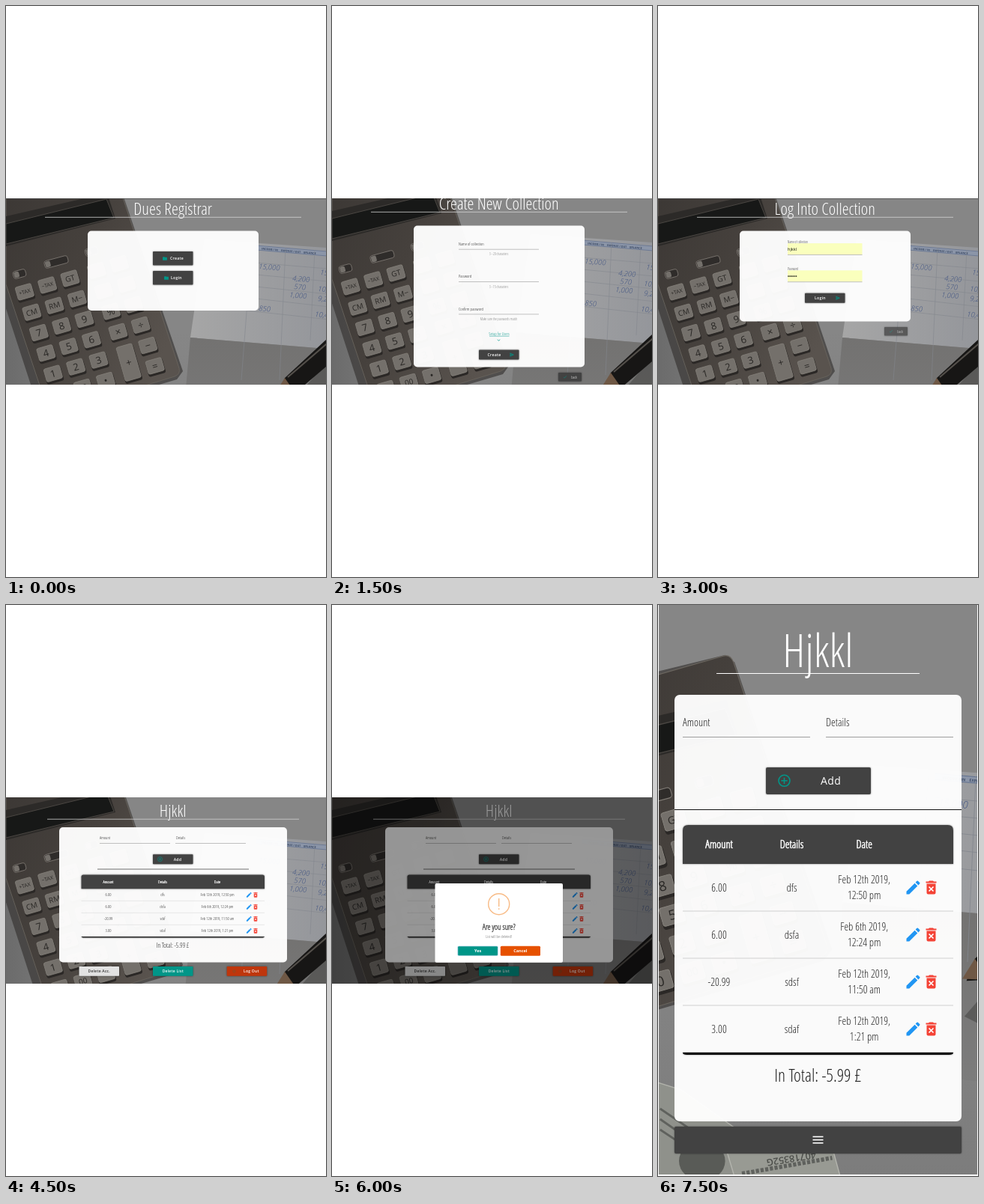
Write an HTML page that moves like this. It is 427 px wide and 763 px high and loops after 9000 ms.

```html
<!DOCTYPE html>
<html lang="en">
<head>
<meta charset="utf-8">
<title>Shared expenses app</title>
<style>
  html, body { margin: 0; width: 100%; height: 100%; overflow: hidden; background: #fff; }
  svg { display: block; width: 427px; height: 763px; }
  text { font-family: "Open Sans", "Noto Sans", sans-serif; white-space: pre; }
  .narrow { font-stretch: 75%; font-weight: 300; }
  .raised { filter: drop-shadow(0 .7px .8px rgba(0, 0, 0, .45)); }
  .ink { font-style: italic; font-weight: 300; fill: #3c5080; }
</style>
</head>
<body>
<svg id="stage" viewBox="0 0 427 763"></svg>
<script>
const stage = document.getElementById('stage');
const TEAL = '#009688', DARK = '#424242';

// Use the condensed face where it exists, otherwise narrow the regular one evenly.
function condensedScale() {
  stage.innerHTML = '<text font-size="50" font-weight="300">Collection</text>' +
    '<text class="narrow" font-size="50">Collection</text>';
  const [normal, narrow] = [...stage.children].map(t => t.getComputedTextLength());
  return narrow < normal * .95 ? 1 : .7;
}
const squeeze = condensedScale();

const rect = (x, y, w, h, fill, r = 0, extra = '') =>
  `<rect x="${x}" y="${y}" width="${w}" height="${h}" rx="${r}" fill="${fill}" ${extra}/>`;
const line = (x1, x2, y, color, width = .6) =>
  `<path d="M${x1} ${y}H${x2}" stroke="${color}" stroke-width="${width}"/>`;
const poly = (points, fill, extra = '') => `<polygon points="${points}" fill="${fill}" ${extra}/>`;
// Only the light cut is condensed, so heavier text gets an outline.
const narrow = (x, y, size, str, fill = '#222', anchor = 'middle', boldness = 0) =>
  `<text class="narrow" transform="translate(${x} ${y}) scale(${squeeze} 1)" font-size="${size}"
    text-anchor="${anchor}" fill="${fill}" stroke="${fill}" stroke-width="${size * boldness}">${str}</text>`;
const label = (x, y, str, fill = '#fff', size = 5.2, weight = 600, spacing = .25) =>
  `<text x="${x}" y="${y}" font-size="${size}" font-weight="${weight}" letter-spacing="${spacing}"
    text-anchor="middle" fill="${fill}">${str}</text>`;
const button = (x, y, w, h, fill = DARK, r = .8) => rect(x, y, w, h, fill, r, 'class="raised"');
const panel = (x, y, w, h, r = 5) => rect(x, y, w, h, 'rgba(255,255,255,.96)', r);

const ICONS = {
  edit: '<path fill="#2196f3" d="M3 17.2V21h3.8L17.8 9.9l-3.7-3.7zM20.7 7a1 1 0 0 0 0-1.4l-2.3-2.3a1 1 0 0 0-1.4 0l-1.9 1.8 3.8 3.8z"/>',
  trash: '<path fill="#f44336" d="M6 19a2 2 0 0 0 2 2h8a2 2 0 0 0 2-2V7H6zM15.5 4l-1-1h-5l-1 1H5v2h14V4z"/>' +
    '<path stroke="#fff" stroke-width="1.7" d="M9 11l6 6m0-6l-6 6"/>',
  folder: `<path fill="${TEAL}" d="M10 4H4a2 2 0 0 0-2 2v12a2 2 0 0 0 2 2h16a2 2 0 0 0 2-2V8a2 2 0 0 0-2-2h-8z"/>`,
  send: `<path fill="none" stroke="${TEAL}" stroke-width="2.6" d="M4 19l16-7L4 5l2 7zM6 12h9"/>`,
  plus: `<path fill="none" stroke="${TEAL}" stroke-width="1.9" d="M12 7v10M7 12h10M3 12a9 9 0 1 0 18 0a9 9 0 1 0-18 0"/>`,
  back: `<path fill="none" stroke="${TEAL}" stroke-width="2" d="M4 13l5 5L19 6"/>`,
  down: `<path fill="none" stroke="${TEAL}" stroke-width="3" d="M5 9l7 6 7-6"/>`,
  exit: '<path fill="none" stroke="#6a5a32" stroke-width="2.5" d="M12 4v8M7 7a7 7 0 1 0 10 0"/>'
};
const icon = (name, cx, cy, size) =>
  `<g transform="translate(${cx - size / 2} ${cy - size / 2}) scale(${size / 24})">${ICONS[name]}</g>`;

function calculator() {
  const rows = [['+TAX', '−TAX', 'GT', '', ''], ['CM', 'RM', 'M−', '', ''], ['7', '8', '9', '%', ''],
    ['4', '5', '6', '×', '÷'], ['1', '2', '3', null, '−'], ['0', '00', '•', null, '=']];
  const key = (col, row, str, height = 19) => {
    const c = col + (col > 2 ? .17 : 0), r = row - 2;
    const size = str.length > 3 ? 7 : str.length > 1 ? 10 : 13;
    return `<g transform="translate(${44 + 30.3 * c + 9.5 * r} ${437 - 9 * c + 27.3 * r}) rotate(-16)">` +
      rect(-11.5, 1 - height / 2, 23.5, height + 1.5, '#2b2826', 3) +
      rect(-11, -height / 2, 22, height - 1, '#74706b', 2.5, 'stroke="#87837d" stroke-width=".7"') +
      `<text y="${size * .36 - .5}" text-anchor="middle" font-size="${size}" fill="#292725">${str}</text></g>`;
  };
  const toggle = (x, y, w) => `<g transform="translate(${x} ${y}) rotate(-15)">` +
    rect(-w / 2, -5, w, 10, '#2f2c2a', 3, 'stroke="#7f7a74" stroke-width=".8"') +
    rect(-w / 2 + 1, -4, 7, 8, '#74706b', 2) + '</g>';
  let out = poly('0,240 134,207 143,214 236,488 228,499 48,552 -4,392', '#353230', 'opacity=".65"') +
    '<path d="M0 246L132 208Q139 206 142 214L231 484Q233 492 225 495L58 546L0 372Z" fill="url(#body)" stroke="#6b665f" stroke-width=".8"/>' +
    poly('0,281 135,250 146,284 0,321', '#2c2a28') +
    poly('0,291 134,258 144,283 0,318', '#171817', 'stroke="#4a4642"') +
    toggle(18, 358, 17) + toggle(67, 342, 32) + toggle(114, 328, 17);
  rows.forEach((row, r) => row.forEach((str, c) => { if (str !== null) out += key(c, r, str); }));
  return out + key(3, 4.5, '+', 48);
}

function ledger() {
  const notes = [[337, 351, '15,000'], [382, 367, '4,200'], [384, 378, '570'], [378, 389, '1,000'],
    [337, 407, '850'], [419, 359, '15,000'], [416, 381, '10,000'], [416, 394, '9,200'], [412, 415, '10,400']];
  return poly('265,312 440,324 440,459 246,443', 'url(#paper)') +
    poly('246,443 440,459 440,620 232,600', 'url(#shade)') +
    poly('334,320 440,329 440,335 334,326', '#8b95a8') +
    '<path d="M334 320L440 329M334 326L440 335" stroke="#5f6f8e" stroke-width=".7"/>' +
    '<path d="M373 323L365 500M412 326L406 447M328 319L314 500M334 343L440 352M334 359L440 369M334 375L440 386M334 391L440 403M322 407L440 420" stroke="#84878e" stroke-width=".6"/>' +
    '<text transform="translate(341 325.5) rotate(5)" font-size="3.6" font-weight="700" fill="#3c4b66">INCOME / IN    EXPENSE / OUT    BALANCE</text>' +
    notes.map(([x, y, s]) => `<text class="ink" transform="translate(${x} ${y}) rotate(5)" font-size="9.5">${s}</text>`).join('');
}

const pen = poly('440,462 440,500 378,560 362,552', '#3f3e3d', 'opacity=".5"') +
  poly('440,434 440,471 386,517 364,518 372,497', '#171615') +
  poly('372,497 386,517 360,516', '#6f5845') +
  '<path d="M376 496L440 441" stroke="#54504b" stroke-width="2"/>';

const banknotes = poly('60,612 92,622 168,676 175,720 60,720', '#8f918b', 'stroke="#b0b1aa"') +
  '<ellipse cx="112" cy="690" rx="22" ry="19" fill="#595b57"/>' +
  '<path d="M72 640l50 34M72 650l40 28M72 660l24 16" stroke="#5f615d" stroke-width="2"/>' +
  poly('136,682 232,662 244,706 148,722', '#989a93', 'stroke="#b4b5ae"') +
  '<text transform="translate(220 681) rotate(171)" font-size="9" font-weight="600" fill="#4c4e4a">40718352G</text>' +
  '<path d="M150 702L236 687" stroke="#5f615d" stroke-width="4" stroke-dasharray="3 1.5"/>';

const gradient = (id, x2, y2, ...colors) => `<linearGradient id="${id}" x2="${x2}" y2="${y2}">` +
  colors.map((c, i) => `<stop offset="${i / (colors.length - 1)}" stop-color="${c}"/>`).join('') + '</linearGradient>';
const defs = `<defs>
  ${gradient('body', 1, .6, '#3b3734', '#46413d', '#59534e')}
  ${gradient('desk', 0, 1, '#868686', '#868686', '#7c7c7c')}
  ${gradient('paper', 1, 0, '#a6a6a6', '#93959a')}
  ${gradient('shade', 0, 1, '#737271', '#7c7c7c')}
  ${gradient('corner', 1, 0, '#6a6a6a', '#7a7a7a')}
  <clipPath id="wide"><rect y="257" width="427" height="249"/></clipPath>
  <clipPath id="tall"><rect x="1" width="425" height="761"/></clipPath>
  <g id="photo">${rect(-5, 150, 450, 570, 'url(#desk)') + poly('-5,350 70,350 70,560 -5,560', 'url(#corner)') +
    ledger() + calculator() + pen + banknotes}</g>
</defs>`;

const photo = transform => `<use href="#photo" transform="${transform}"/>`;
const wide = (dy, content) => `<g clip-path="url(#wide)">${photo(`translate(0 ${dy})`)}${content}</g>`;
const heading = (str, y, x1 = 52, x2 = 394) =>
  narrow(222.7, y - 3.3, 22.7, str, '#fff') + line(x1, x2, y, '#d4d4d4', .8);
const topEdge = line(0, 427, 257.4, '#484848', .8);
const backButton = y => button(302, y, 31, 11.5) + icon('back', 311, y + 5.7, 6) + narrow(323, y + 7.6, 5.2, 'back', '#fff');
const sendButton = (y, str) => button(196, y, 53.5, 13) + label(216.5, y + 8.5, str) + icon('send', 240, y + 6.5, 7);

function home() {
  const choice = (y, str, iconX, textX) => button(196, y, 53.5, 18.5) + icon('folder', iconX, y + 9.5, 7) + label(textX, y + 11.3, str);
  return wide(0, topEdge + heading('Dues Registrar', 282.3) + panel(109, 300.5, 228, 106.5) +
    choice(328, 'Create', 212, 228) + choice(354, 'Login', 214, 227.5));
}

function create() {
  const field = (y, name, hint) => narrow(169, y, 5.6, name, '#222', 'start') + line(169, 276, y + 5.2, '#999') +
    narrow(222.5, y + 13.2, 4.8, hint, '#777');
  return wide(-7, heading('Create New Collection', 275.3) + panel(109, 293.5, 228, 189) +
    field(320, 'Name of collection', '3 - 20 characters') + field(363.3, 'Password', '3 - 15 characters') +
    field(406.7, 'Confirm password', 'Make sure the passwords match') +
    narrow(223, 440, 5.6, 'Setup for Users', TEAL) + line(210, 236.5, 441.2, TEAL, .5) + icon('down', 222.5, 446.5, 6) +
    sendButton(459.5, 'Create') + backButton(490));
}

function login() {
  const field = (y, name) => narrow(173, y, 4.5, name, '#333', 'start') + rect(173, y + .6, 99.5, 15, '#faffbd') +
    line(173, 272.5, y + 16, '#999');
  const dots = Array.from({ length: 6 }, (_, i) => `<circle cx="${174 + i * 2.1}" cy="361" r=".85" fill="#111"/>`).join('');
  return wide(0, topEdge + heading('Log Into Collection', 282.3) + panel(109, 300.5, 228, 121) +
    field(316.5, 'Name of collection') + field(352.7, 'Password') + dots +
    '<text x="173" y="326.6" font-size="5.6" font-weight="500" fill="#111">hjkkl</text>' +
    sendButton(383.7, 'Login') + `<g opacity=".75">${backButton(429)}</g>`);
}

const entries = [['6.00', 'dfs', 'Feb 12th 2019,', '12:50 pm'], ['6.00', 'dsfa', 'Feb 6th 2019,', '12:24 pm'],
  ['-20.99', 'sdsf', 'Feb 12th 2019,', '11:50 am'], ['3.00', 'sdaf', 'Feb 12th 2019,', '1:21 pm']];

function table({ x, y, w, head, row, size, columns, icons, iconSize, twoLines }) {
  const r = size * .5, base = size * .35, end = y + head + row * 4;
  let out = `<path class="raised" fill="${DARK}" d="M${x} ${y + head}V${y + r}q0 ${-r} ${r} ${-r}H${x + w - r}q${r} 0 ${r} ${r}V${y + head}z"/>`;
  ['Amount', 'Details', 'Date'].forEach((s, i) => out += narrow(columns[i], y + head / 2 + base, size, s, '#fff', 'middle', .04));
  entries.forEach(([amount, details, day, time], i) => {
    const cy = y + head + row * (i + .5), text = cy + base;
    out += narrow(columns[0], text, size, amount) + narrow(columns[1], text, size, details);
    out += twoLines ? narrow(columns[2], text - 10.5, size, day) + narrow(columns[2], text + 10.5, size, time)
      : narrow(columns[2], text, size, day + ' ' + time);
    out += icon('edit', icons[0], cy, iconSize) + icon('trash', icons[1], cy, iconSize);
    if (i < 3) out += line(x, x + w, cy + row / 2, '#d0d0d0', twoLines ? 1 : .5);
  });
  const b = size * .2;
  return out + `<path class="raised" d="M${x} ${end}H${x + w}q0 ${b} ${-2 * b} ${b}H${x + 2 * b}q${-2 * b} 0 ${-2 * b} ${-b}z"/>`;
}

function list(overlay = '') {
  return wide(-7, heading('Hjkkl', 286.2, 55, 391) + panel(71, 297, 304, 180.5) +
    narrow(125, 312.5, 5.6, 'Amount', '#222', 'start') + narrow(227, 312.5, 5.6, 'Details', '#222', 'start') +
    line(125, 219, 318.5, '#999') + line(226, 320, 318.5, '#999') +
    button(196, 333.3, 53.5, 13) + icon('plus', 205.5, 339.6, 8) + label(229, 341.6, 'Add') +
    line(122, 324, 353, '#333', .7) +
    table({ x: 100.5, y: 360.5, w: 244.5, head: 18.8, row: 16, size: 5.6, columns: [136.5, 209, 282], icons: [324.3, 333], iconSize: 9 }) +
    narrow(222.5, 458.3, 8.9, 'In Total: -5.99 £') +
    button(97.5, 483, 53.5, 12.8, '#e2e2e2') + label(124.3, 491.2, 'Delete Acc.', '#333', 5) +
    button(196, 483, 53.5, 12.8, TEAL) + label(222.8, 491.2, 'Delete List', '#fff', 5) +
    button(294.7, 483, 53.5, 12.8, '#bf360c') + icon('exit', 304.5, 489.3, 6) + label(327.3, 491.2, 'Log Out', '#fff', 5) +
    overlay);
}

function confirmDelete() {
  return list(rect(0, 257, 427, 249, 'rgba(0,0,0,.4)') + rect(137.5, 372, 170.5, 105.7, '#fff', 2) +
    '<circle cx="222.7" cy="399.7" r="14" fill="none" stroke="#f8bb86" stroke-width="1.4"/>' +
    '<path d="M222.7 392V403M222.7 405.3V407" stroke="#f8bb86" stroke-width="1.4"/>' +
    narrow(222.7, 433.5, 10.3, 'Are you sure?', '#444', 'middle', .03) + narrow(222.7, 445.3, 5.6, 'List will be deleted!', '#666') +
    rect(167.3, 455.5, 54.5, 13.6, '#b5d5e8', 2) + rect(168.2, 456.3, 52.7, 12, TEAL, 1) + label(194.6, 464.4, 'Yes', '#fff', 5.5, 700, 0) +
    rect(224.8, 455.8, 53.2, 13, '#e65100', 1.5) + label(251.3, 464.4, 'Cancel', '#fff', 5.5, 700, 0));
}

function phone() {
  return `<g clip-path="url(#tall)">${photo('matrix(1.4 0 0 1.4 -98 -223)')}` +
    narrow(213.5, 82.5, 60, 'Hjkkl', '#fff') + line(78, 349, 91.5, '#fff', 1) + panel(22, 120, 383, 570, 7) +
    narrow(33, 162, 14.5, 'Amount', '#222', 'start') + narrow(224, 162, 14.5, 'Details', '#222', 'start') +
    line(33, 203, 176.5, '#9e9e9e', 1) + line(224, 394, 176.5, '#9e9e9e', 1) +
    button(144, 217, 140, 36, DARK, 2) + icon('plus', 168.5, 234.8, 20) + label(230.7, 240, 'Add', '#fff', 14, 400, .5) +
    line(22, 405, 273.5, '#111', 1) +
    table({ x: 33, y: 294, w: 361, head: 52, row: 63, size: 14.5, columns: [81.5, 178.5, 275.2], icons: [340.5, 364.5], iconSize: 24, twoLines: true }) +
    narrow(213.3, 637, 23.5, 'In Total: -5.99 £') + button(22, 697, 383, 36, DARK, 2) +
    [710.5, 714.7, 718.9].map(y => line(206.5, 220.5, y, '#fff', 1.6)).join('') + '</g>';
}

const scenes = [home, create, login, list, confirmDelete, phone];
stage.innerHTML = defs + scenes.map(scene => `<g class="scene">${scene()}</g>`).join('');
const groups = stage.querySelectorAll('.scene');

function draw() {
  const current = Math.floor(performance.now() % 9000 / 1500);
  groups.forEach((group, i) => group.style.display = i === current ? '' : 'none');
  requestAnimationFrame(draw);
}
draw();
</script>
</body>
</html>
```
